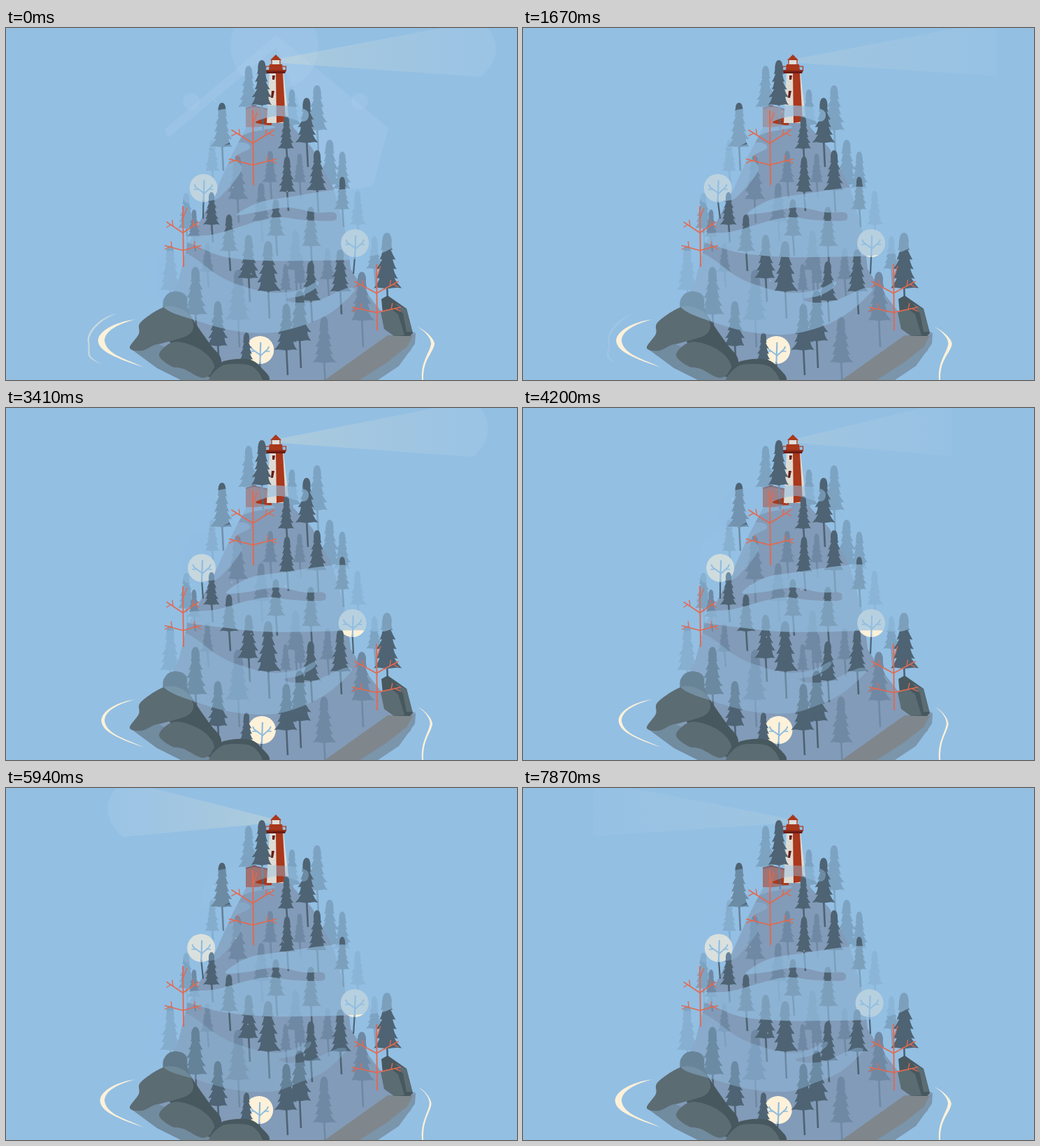
Write an HTML page with a canvas that moves like this. It is 731 by 504 pixels and loops after 8000 ms.

```html
<!DOCTYPE html>
<html lang="en">
<head>
<meta charset="utf-8">
<title>Lighthouse hill</title>
<style>
html, body { margin: 0; width: 731px; height: 504px; overflow: hidden; background: #93bfe3; }
canvas { display: block; }
</style>
</head>
<body>
<canvas id="stage" width="731" height="504"></canvas>
<script>
const c = document.getElementById('stage').getContext('2d');
const SKY = '#93bfe3', HILL = '#829bb8', CREAM = '#fdf1d9';
const RED = '#a9381c', MAROON = '#6b1c15', CORAL = '#e2694f';
const DARK = '#4e6373', ROCK = '#5c6c73', SHADE = '#48585f', WET = '#718b9f';
const LOOP = 8000, STEPS = 52;

const wave = (t, mid, amp, period, phase = 0) =>
  mid + amp * Math.cos(2 * Math.PI * (t - phase) / period);

function poly(pts, color) {
  c.beginPath();
  for (let i = 0; i < pts.length; i += 2) c.lineTo(pts[i], pts[i + 1]);
  c.closePath();
  c.fillStyle = color;
  c.fill();
}

// Closed smooth curve through every point.
function blob(pts, color) {
  const n = pts.length / 2;
  const at = i => [pts[(i + n) % n * 2], pts[(i + n) % n * 2 + 1]];
  c.beginPath();
  c.moveTo(pts[0], pts[1]);
  for (let i = 0; i < n; i++) {
    const a = at(i - 1), b = at(i), d = at(i + 1), e = at(i + 2);
    c.bezierCurveTo(b[0] + (d[0] - a[0]) / 6, b[1] + (d[1] - a[1]) / 6,
      d[0] - (e[0] - b[0]) / 6, d[1] - (e[1] - b[1]) / 6, d[0], d[1]);
  }
  c.fillStyle = color;
  c.fill();
}

function line(pts, color, width) {
  c.beginPath();
  for (let i = 0; i < pts.length; i += 2) c.lineTo(pts[i], pts[i + 1]);
  c.strokeStyle = color;
  c.lineWidth = width;
  c.stroke();
}

function disc(x, y, r, color) {
  c.beginPath();
  c.arc(x, y, r, 0, Math.PI * 2);
  c.fillStyle = color;
  c.fill();
}

// Width and trunk follow from the height; the tiers droop outwards.
function fir(x, top, h, color) {
  const half = h * 0.235, tiers = 5;
  c.beginPath();
  for (const s of [-1, 1]) {
    c.moveTo(x, top);
    c.quadraticCurveTo(x + s * half * 0.3, top, x + s * half * 0.36, top + h * 0.14);
    for (let i = 1; i <= tiers; i++) {
      const p = i / tiers, wob = 1 + 0.1 * Math.sin(x * 3 + i * 2.4 + s);
      const w = half * (0.32 + 0.68 * p) * wob, y = top + h * (0.14 + 0.83 * p);
      c.quadraticCurveTo(x + s * w * 0.72, y - h * 0.07, x + s * w, y);
      c.lineTo(x + s * w * 0.66, y - h * 0.01);
    }
    c.lineTo(x, top + h * 0.98);
    c.closePath();
  }
  c.fillStyle = color;
  c.fill();
  line([x, top + h * 0.9, x + 2, top + h * 1.5], color, 2.6);
}

// Each fir: x, top, height.
const pale = [[347, 54, 61], [445, 82, 66], [409, 88, 52], [463, 160, 66], [481, 177, 55],
  [503, 233, 50], [527, 298, 48], [295, 160, 46], [258, 236, 52], [235, 312, 65]];
const middle = [[331, 183, 64], [365, 222, 56], [420, 180, 42], [378, 176, 46],
  [269, 260, 40], [332, 346, 74], [288, 308, 42], [400, 338, 38], [421, 324, 42],
  [460, 315, 46], [455, 413, 68], [509, 349, 72], [414, 290, 58]];
const dark = [[366, 46, 66], [309, 107, 65], [430, 100, 66], [401, 126, 48], [402, 184, 52],
  [445, 175, 59], [481, 213, 48], [294, 235, 48], [319, 267, 54], [386, 245, 54],
  [436, 256, 58], [347, 296, 64], [375, 305, 74], [436, 334, 58], [478, 317, 62],
  [545, 293, 82], [271, 342, 70], [303, 391, 66], [344, 436, 48], [401, 395, 68], [420, 376, 74]];

function beam(t) {
  const turn = -Math.tanh((t - 5.04) * 1.2), d = Math.sign(turn) || 1;
  const pulse = wave(t, 0, -1, 3.4, 1.1);
  const x = 386 + turn * (306 + 20 * pulse);
  const a = 0.2 + 0.08 * pulse, round = pulse > 0.1;
  const tint = (rgb, k) => `rgba(${rgb},${a * k})`;
  const g = c.createLinearGradient(386, 0, x, 0);
  g.addColorStop(0, tint('235,232,200', 1.15));
  g.addColorStop(0.58, tint('210,222,218', 0.85));
  g.addColorStop(1, tint('205,226,240', 0.5));
  const end = round ? x - d * 21 : x;
  c.beginPath();
  c.moveTo(386 + d * 5, 44);
  c.lineTo(end, -11);
  if (round) c.quadraticCurveTo(x + d * 21, 30, end, 70);
  else c.lineTo(end, 69);
  c.lineTo(386 + d * 5, 50);
  c.closePath();
  c.fillStyle = g;
  c.fill();
}

function halo(t) {
  c.globalAlpha = Math.max(0, 1 - t / 0.8);
  const glow = 'rgba(190,218,240,.16)';
  disc(384, 26, 63, glow);
  poly([387, 10, 547, 143, 525, 226, 470, 236, 387, 28, 231, 158, 227, 145], glow);
  for (const x of [265, 506]) disc(x, 105, 12, glow);
  c.globalAlpha = 1;
}

function land() {
  poly([345, 140, 380, 133, 405, 136, 438, 172, 468, 228, 488, 300, 493, 345, 510, 372, 540, 410,
    586, 437, 579, 462, 532, 504, 250, 504, 190, 462, 228, 400, 247, 360,
    259, 312, 298, 238, 324, 180], HILL);
  poly([586, 437, 585, 452, 562, 484, 532, 504, 480, 504], '#7b95ab');
  poly([582, 440, 574, 456, 545, 479, 506, 504, 456, 504, 546, 440], '#7f878d');
}

function rocks() {
  poly([178, 459, 212, 450, 300, 490, 290, 508, 250, 504, 216, 487], WET);
  blob([225, 402, 229, 383, 243, 377, 258, 384, 262, 408, 290, 450, 308, 476, 292, 500, 240, 460], SHADE);
  blob([177, 458, 190, 438, 193, 421, 228, 399, 256, 405, 268, 424, 260, 440, 225, 451, 212, 454, 194, 462], ROCK);
  blob([219, 468, 238, 450, 265, 454, 288, 468, 298, 487, 282, 501, 254, 488, 236, 484], ROCK);
  blob([294, 504, 301, 483, 321, 475, 349, 475, 365, 486, 376, 505, 335, 512], SHADE);
  blob([291, 507, 305, 486, 325, 481, 353, 485, 366, 508, 330, 514], ROCK);
  poly([537, 388, 546, 383, 573, 402, 582, 437, 578, 441, 556, 441, 541, 430], SHADE);
  poly([536, 407, 551, 402, 561, 410, 570, 440, 555, 441, 541, 431], ROCK);
  poly([557, 394, 573, 403, 581, 435, 573, 435, 568, 409], ROCK);
}

function lighthouse() {
  poly([343, 114, 355, 111, 381, 117, 380, 139, 358, 142, 343, 142], RED);
  line([343, 115, 355, 112, 381, 118], MAROON, 2);
  poly([377, 64, 397, 64, 404, 126, 396, 136, 373, 136], '#dedbd3');
  poly([386, 64, 396, 64, 400, 134, 387, 136], RED);
  poly([381, 68, 385, 68, 384, 74, 381, 74], MAROON);
  poly([380, 90, 384, 90, 382, 100, 379, 100], MAROON);
  poly([380, 46, 392, 46, 393, 55, 379, 55], '#dedfdb');
  poly([378, 46, 386, 38, 394, 46], RED);
  poly([377, 52, 395, 52, 396, 60, 376, 60], RED);
  poly([371, 60, 401, 60, 399, 65, 373, 65], MAROON);
  c.strokeStyle = RED;
  c.lineWidth = 1.2;
  c.strokeRect(371.5, 55, 29, 6);
  for (const x of [380, 392]) line([x, 45, x, 55], RED, 1.3);
}

function moon(x, y, rootX) {
  const blue = '#8dbbdf';
  disc(x, y, 20, CREAM);
  line([x, y + 17, rootX, y + 44], DARK, 2.2);
  line([x, y + 20, x + 1, y - 11], blue, 2.2);
  for (const s of [-1, 1]) {
    line([x, y + 8 + s, x + s * 11, y - 1, x + s * 13, y - 5], blue, 1.9);
    line([x + s * 8, y + 2, x + s * 14, y + 2], blue, 1.5);
  }
}

function fog(t) {
  const thin = wave(t, 0.46, 0.15, 11, 1.2);
  c.globalAlpha = thin + 0.1;
  blob([290, 124, 340, 113, 390, 111, 426, 116, 433, 126, 424, 134, 390, 126,
    357, 135, 385, 142, 345, 151, 302, 172, 280, 165], SKY);
  c.globalAlpha = thin;
  blob([300, 172, 322, 166, 341, 164, 349, 172, 328, 185, 337, 203,
    311, 237, 294, 247, 255, 247, 260, 190], SKY);

  // The middle bank slides back and forth and its lower edge breathes.
  c.globalAlpha = 0.66;
  const dx = 17 * (1 - t / 4.95) ** 2, up = dx * 0.4, ly = 322 + wave(t, 4.5, 6.5, 8, -0.2);
  blob([313 + dx, 264 + up / 2, 345 + dx, 243 + up, 390 + dx, 235 + up, 485, 224 + up, 540, 240,
    560, 300, 545, 319, 500, ly - 2, 440, ly, 370, ly, 310, ly - 6, 262, 308, 225, 300,
    262, 291 + up, 300, 288 + up, 345 + dx, 276, 375 + dx, 271, 410 + dx, 275,
    450 + dx, 276, 456 + dx, 270, 451 + dx, 264, 425 + dx, 264, 385 + dx, 257, 340 + dx, 264], SKY);

  c.globalAlpha = wave(t, 0.47, 0.14, 9.4, 1.2);
  const slide = wave(t, 0, 1, 12, 1), lx = 396 + 6.5 * slide, rx = 492 + 7 * slide;
  const by = wave(t, 436.5, 2.5, 9, 2.4);
  blob([218, 326, 256, 322, 305, 355, 340, 370, 380, 379, lx + 18, 375,
    lx + 44, 363, lx + 42, 372, lx + 22, 383, lx, 388, lx + 12, 393, lx + 42, 391,
    rx - 20, 376, rx - 7, 372, rx, 377, rx - 31, 406, rx - 69, by - 12,
    380, by, 325, by - 3, 270, by - 18, 228, 402, 215, 375], SKY);
  c.globalAlpha = 1;
}

// Two pairs of forked boughs on one trunk.
function coralTree(x, top, foot, reach) {
  const h = foot - top;
  line([x + 1, foot, x, top], CORAL, 1.9);
  line([x, top + h * 0.2, x + 6, top + 3], CORAL, 1.3);
  for (const s of [-1, 1]) {
    for (const [level, size, lift] of [[0.44, 0.9, 0.18], [0.73, 1, 0.08]]) {
      const dx = s * reach * size, dy = -h * lift, y = top + h * level;
      line([x, y, x + dx, y + dy], CORAL, 1.7);
      line([x + dx * 0.6, y + dy * 0.6, x + dx * 0.65, y + dy * 0.6 - 9], CORAL, 1.4);
      line([x + dx * 0.75, y + dy * 0.75, x + dx, y + dy * 0.75 + 4], CORAL, 1.3);
    }
  }
}

function crescent(x0, y0, x, y, x1, y1, thick) {
  c.beginPath();
  c.moveTo(x0, y0);
  c.bezierCurveTo(x + (x0 - x) * 0.4, y0 + 4, x - 3, y - 12, x, y + 2);
  c.bezierCurveTo(x + 3, y + 18, x1 - 28, y1 - 10, x1, y1);
  c.bezierCurveTo(x1 - 24, y1 - 12, x + thick + 3, y + 20, x + thick, y);
  c.bezierCurveTo(x + thick, y - 14, x + thick + 18, y0 + 7, x0, y0);
  c.fillStyle = CREAM;
  c.fill();
}

function waves(t) {
  crescent(186, 417, wave(t, 134.5, -2.5, 8), 448, 197, 486, wave(t, 6.5, 2.5, 8));
  c.globalAlpha = Math.max(0, 0.5 - t * 0.25);
  crescent(159, 409, 117 + t * 3, 448, 137, 481, 2);
  c.globalAlpha = 1;
  const r = wave(t, 611, 3, 8, 1), in1 = r - wave(t, 4, 1.5, 8, 1);
  c.beginPath();
  c.moveTo(589, 428);
  c.bezierCurveTo(600, 433, r - 1, 444, r, 452);
  c.bezierCurveTo(r - 2, 466, 596, 474, 597, 504);
  c.lineTo(595, 504);
  c.bezierCurveTo(593, 477, in1 - 2, 466, in1, 452);
  c.bezierCurveTo(in1, 444, 600, 435, 589, 428);
  c.fillStyle = CREAM;
  c.fill();
}

function flakes(t) {
  c.globalAlpha = 0.45;
  for (let i = 0; i < 5; i++) {
    const p = (t / 8 + i * 0.37) % 1;
    disc(300 + i * 25 + 4 * Math.sin(p * 6 + i), 105 + i % 3 * 105 + p * 50, 1, '#d5e4ec');
  }
  c.globalAlpha = 1;
}

function draw(t) {
  c.fillStyle = SKY;
  c.fillRect(0, 0, 731, 504);
  halo(t);
  beam(t);
  for (const f of pale) fir(...f, '#7da3c2');
  land();
  for (const f of middle) fir(...f, '#6f89a4');
  lighthouse();
  moon(wave(t, 280, 2.5, 4.5), 229, 282);
  moon(wave(t, 497.5, 2.5, 4.5, 0.6), 308, 497);
  moon(wave(t, 364, -2, 5.2, 1), 461, 363);
  for (const f of dark) fir(...f, DARK);
  rocks();
  fog(t);
  coralTree(353, 118, 225, 34);
  coralTree(253, 255, 342, 26);
  coralTree(530, 338, 433, 35);
  waves(t);
  flakes(t);
}

function tick(now) {
  const step = Math.floor((now % LOOP) * STEPS / LOOP + 0.1) % STEPS;
  draw(step * LOOP / STEPS / 1000);
  requestAnimationFrame(tick);
}
draw(0);
requestAnimationFrame(tick);
</script>
</body>
</html>
```
